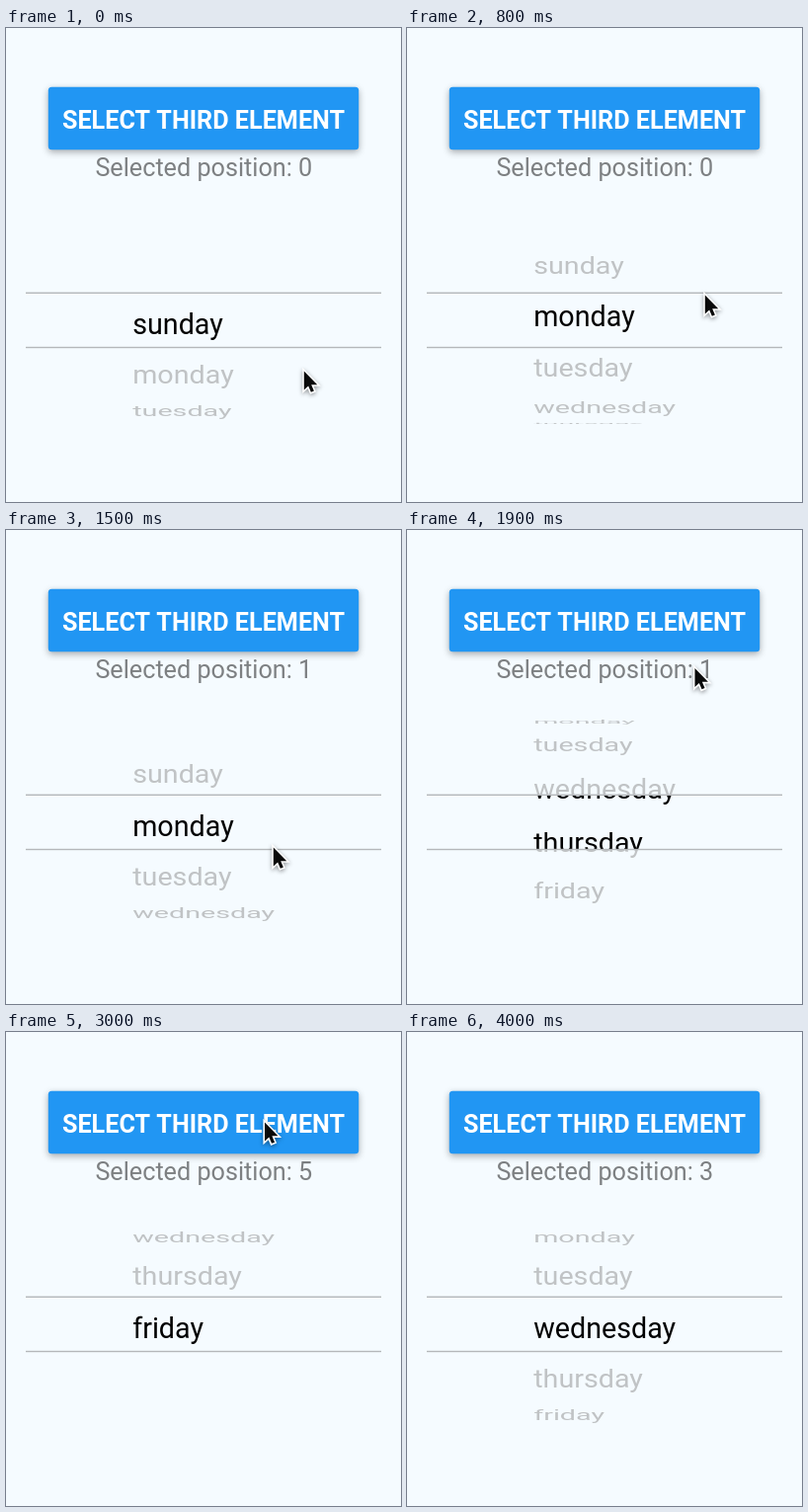
Recreate the animation shown at these times as an HTML page with a canvas. Size 400 by 480 pixels, loop 4200 ms.

```html
<!DOCTYPE html>
<html lang="en">
<head>
<meta charset="utf-8">
<title>Wheel picker</title>
<style>
  html, body { margin: 0; width: 100%; height: 100%; overflow: hidden; background: #f5fbff; }
  canvas { display: block; }
</style>
</head>
<body>
<canvas id="stage" width="400" height="480"></canvas>
<script>
const ctx = document.getElementById('stage').getContext('2d');
const LOOP = 4200, STEP = 100;
const PRESS = 3400, JUMP = 3600, PRESS_END = 4000;
const DAYS = ['sunday', 'monday', 'tuesday', 'wednesday', 'thursday', 'friday'];
const WHEEL = { x: 128.2, y: 296, radius: 104, rowAngle: Math.PI / 6, baseline: 14, top: 268.3, bottom: 323.5 };
const BUTTON = { x: 42.8, y: 59.8, w: 314.4, h: 63.4, r: 3.5 };

const smooth = k => k * k * (3 - 2 * k);
const decelerate = k => k * (2 - k);

const CURSOR = {
  start: { x: 301, y: 346 },
  moves: [
    { from: 200, to: 800, x: 301, y: 269 },   // drag one row
    { from: 900, to: 1500, x: 270, y: 320 },  // return
    { from: 1500, to: 1970, x: 292, y: 127 }, // fling
    { from: 2400, to: 2700, x: 388, y: 194 }, // wander off
    { from: 2800, to: 3030, x: 255, y: 85 }   // reach the button
  ]
};
const SCROLL = {
  start: { row: 0 },
  moves: [
    { from: 200, to: 800, row: 1.15 },
    { from: 800, to: 1100, row: 1 },
    { from: 1600, to: 2300, row: 5, ease: decelerate },
    { from: JUMP - 1, to: JUMP, row: 3 }
  ]
};

function poseAt({ start, moves }, t) {
  const pose = { ...start };
  for (const move of moves) {
    const k = Math.min(1, Math.max(0, (t - move.from) / (move.to - move.from)));
    const ease = move.ease || smooth;
    for (const key in pose) pose[key] += (move[key] - pose[key]) * ease(k);
  }
  return pose;
}

function selectedAt(t) {
  return t < 1200 ? 0 : t < 2500 ? 1 : t < JUMP ? 5 : 3;
}

function drawText(text, x, y, font, color, align) {
  ctx.font = font + ' Roboto, sans-serif';
  ctx.fillStyle = color;
  ctx.textAlign = align;
  ctx.fillText(text, x, y);
}

function drawButton(t, cursor) {
  const { x, y, w, h, r } = BUTTON;
  ctx.save();
  ctx.beginPath();
  ctx.roundRect(x, y, w, h, r);
  ctx.shadowColor = 'rgba(0,0,0,.32)';
  ctx.shadowBlur = 7;
  ctx.shadowOffsetY = 2.5;
  ctx.fillStyle = '#2196f3';
  ctx.fill();
  ctx.shadowColor = 'transparent';
  if (t >= PRESS && t < PRESS_END) {
    const k = (t - PRESS) / (PRESS_END - PRESS);
    ctx.clip();
    ctx.beginPath();
    ctx.arc(cursor.x, cursor.y, 30 + 330 * k, 0, 2 * Math.PI);
    ctx.fillStyle = `rgba(0,0,0,${0.13 * Math.min(1, 2 - 2 * k)})`;
    ctx.fill();
  }
  ctx.restore();
  drawText('SELECT THIRD ELEMENT', 200, 102.4, 'bold 25.2px', '#fff', 'center');
}

function drawRows(scroll, color) {
  DAYS.forEach((day, i) => {
    const angle = (i - scroll) * WHEEL.rowAngle;
    if (Math.abs(angle) >= Math.PI / 2) return;
    ctx.save();
    ctx.translate(WHEEL.x, WHEEL.y + WHEEL.radius * Math.sin(angle));
    ctx.scale(1, Math.cos(angle));
    drawText(day, 0, WHEEL.baseline, '28.7px', color, 'left');
    ctx.restore();
  });
}

function drawBand(top, bottom, scroll, color) {
  ctx.save();
  ctx.beginPath();
  ctx.rect(0, top, 400, bottom - top);
  ctx.clip();
  drawRows(scroll, color);
  ctx.restore();
}

function drawWheel(scroll) {
  const { y, radius, top, bottom } = WHEEL;
  drawBand(y - radius, top, scroll, '#c0c3c5');
  drawBand(top, bottom, scroll, '#000');
  drawBand(bottom, y + radius + 1, scroll, '#c0c3c5');
  ctx.fillStyle = '#b4b7ba';
  for (const line of [top, bottom]) ctx.fillRect(20, line - 0.7, 360, 1.4);
}

function drawCursor({ x, y }) {
  ctx.save();
  ctx.translate(x + 0.8, y + 1.5);
  ctx.scale(1.12, 1.12);
  const arrow = new Path2D('M0 0V17L3.9 13.4 6.3 19 9 17.9 6.6 12.3H12Z');
  ctx.lineWidth = 2.8;
  ctx.strokeStyle = '#fff';
  ctx.shadowColor = 'rgba(0,0,0,.4)';
  ctx.shadowBlur = 4;
  ctx.shadowOffsetY = 1.5;
  ctx.stroke(arrow);
  ctx.shadowColor = 'transparent';
  ctx.fillStyle = '#0a0a0a';
  ctx.fill(arrow);
  ctx.restore();
}

function draw(now) {
  const t = Math.floor((now % LOOP) / STEP) * STEP;
  const cursor = poseAt(CURSOR, t);
  ctx.fillStyle = '#f5fbff';
  ctx.fillRect(0, 0, 400, 480);
  drawButton(t, cursor);
  drawText('Selected position: ' + selectedAt(t), 200.3, 150.4, '25.2px', 'rgba(0,0,0,.49)', 'center');
  drawWheel(poseAt(SCROLL, t).row);
  if (t < PRESS_END) drawCursor(cursor);
}

let start;
function tick(now) {
  start ??= now;
  draw(now - start);
  requestAnimationFrame(tick);
}
draw(0);
requestAnimationFrame(tick);
</script>
</body>
</html>
```
